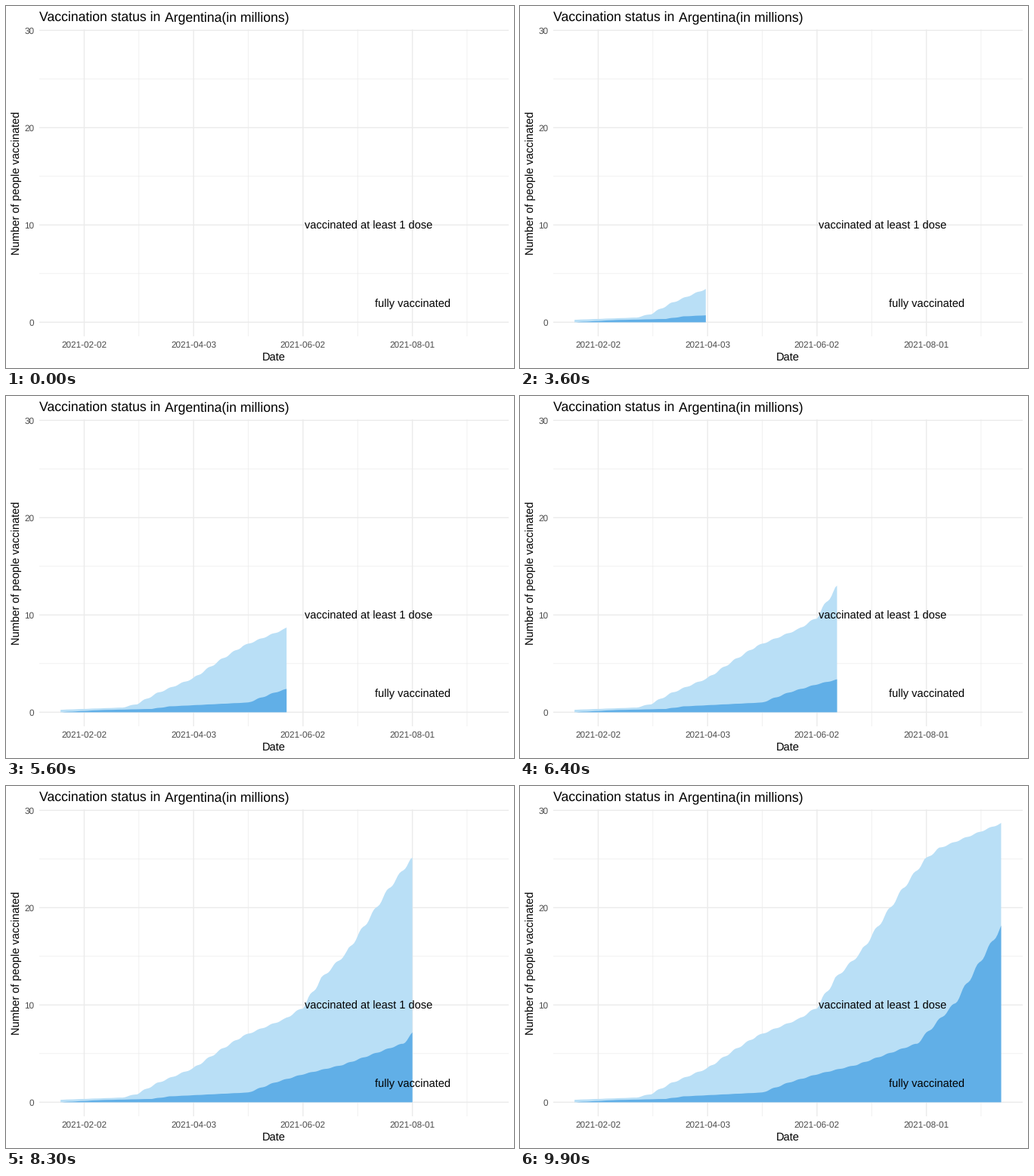
A matplotlib script for the animation above (10 s loop, 672 px wide and 480 px high).

```python
import numpy as np
import matplotlib.pyplot as plt
from matplotlib.animation import FuncAnimation
from matplotlib.patches import Polygon

plt.rcParams["font.family"] = "Liberation Sans"
plt.rcParams["text.hinting"] = "none"

W, H, DPI = 672, 480, 100
PX = 72 / DPI                      # points per pixel
FRAMES, INTERVAL = 100, 100
LAST_DAY = 234                     # days since 2021-01-20
LEAD = 22                          # empty days before the first value
PEAK = 28.67
LIGHT, DARK, GRID, TICK = "#b9dff6", "#61afe7", "#ebebeb", "#4d4d4d"

days = np.arange(LAST_DAY + 1)


def cumulative(*keys):
    """Trend through (day, millions) keys, with fewer doses given at weekends."""
    trend = np.interp(days, *zip(*keys))
    week = 2 * np.pi / 7
    return trend + np.gradient(trend) * .6 / week * np.sin(week * (days - 2))


one_dose = cumulative((0, .25), (34, .48), (42, .85), (53, 1.95), (73, 3.5),
                      (88, 5.4), (100, 6.8), (123, 8.55), (133, 9.75),
                      (143, 12.7), (157, 15.4), (180, 21.9), (192, 24.9),
                      (200, 26.1), (LAST_DAY, PEAK))
full = cumulative((0, 0), (22, .22), (50, .34), (60, .6), (103, 1), (118, 2.05),
                  (133, 2.87), (155, 3.85), (173, 5.05), (188, 6.05),
                  (209, 10.25), (LAST_DAY, 18))

fig = plt.figure(figsize=(W / DPI, H / DPI), dpi=DPI, facecolor="white")

# Panel edges in pixels from the top left
left, right, top, bottom = 43.9, 664.67, 31.0, 437.8
ax = fig.add_axes([left / W, 1 - bottom / H, (right - left) / W, (bottom - top) / H])
ax.axis("off")
ax.set_xlim(-.05 * LAST_DAY, 1.05 * LAST_DAY)
ax.set_ylim(-.05 * PEAK, 1.05 * PEAK)


def grid(xs, ys, width):
    style = dict(color=GRID, lw=width * PX, snap=False, zorder=1)
    for x in xs:
        ax.axvline(x, **style)
    for y in ys:
        ax.axhline(y, **style)


def label(x, y, text, size=14.67, color="black", ha="center", rotation=0):
    """Place text with its baseline at a pixel position."""
    fig.text(x / W, 1 - y / H, text, fontsize=size * PX, color=color, ha=ha,
             va="baseline", rotation=rotation, rotation_mode="anchor")


def px(day, value):
    """Data position in pixels from the top left."""
    x, y = ax.transData.transform((day, value))
    return x, H - y


ticks = {13: "2021-02-02", 73: "2021-04-03", 133: "2021-06-02", 193: "2021-08-01"}
grid([d + 30 for d in ticks], range(5, 30, 10), .71)
grid(ticks, range(0, 31, 10), 1.42)

for day, name in ticks.items():
    label(px(day, 0)[0], 453, name, 11.73, TICK)
for v in range(0, 31, 10):
    label(37.4, px(0, v)[1] + 4.2, str(v), 11.73, TICK, ha="right")

# Two pieces keep the full word space before the capital A
label(left + .5, 20, "Vaccination status in", 17.6, ha="left")
label(210.4, 20, "Argentina(in millions)", 17.6, ha="left")
label((left + right) / 2, 470, "Date")
label(18, (top + bottom) / 2, "Number of people vaccinated", rotation=90)

for day, v, text in ((169, 10, "vaccinated at least 1 dose"), (193, 2, "fully vaccinated")):
    ax.annotate(text, (day, v), xytext=(0, -5.4 * PX), textcoords="offset points",
                fontsize=14.67 * PX, ha="center", va="baseline", zorder=5)

areas = []
for values, color in ((one_dose, LIGHT), (full, DARK)):
    patch = Polygon([(0, 0)] * 3, fc=color, ec="none", lw=0, snap=False, zorder=2)
    ax.add_patch(patch)
    areas.append((patch, values))


def draw(i):
    # Each whole day appears on the frame nearest to its time
    day = min(int((i + .5) * (LAST_DAY + LEAD) / (FRAMES - 1)) - LEAD, LAST_DAY)
    for patch, values in areas:
        patch.set_visible(day > 0)
        if day > 0:
            curve = np.column_stack([days, values])[:day + 1]
            patch.set_xy(np.vstack([(0, 0), curve, (day, 0)]))
    return [patch for patch, _ in areas]


anim = FuncAnimation(fig, draw, frames=FRAMES, interval=INTERVAL,
                     init_func=lambda: draw(0), repeat=True, repeat_delay=0, blit=False)
plt.show()
```
